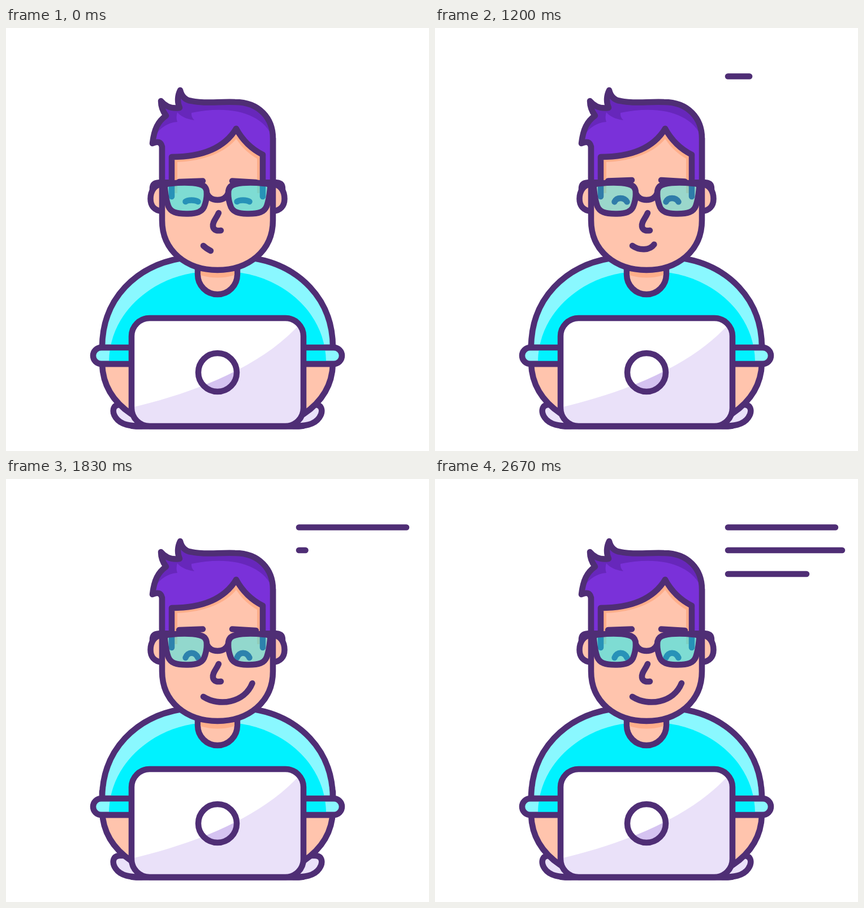
An HTML page that plays this animation: 748 px wide and 748 px high, repeating every 3030 ms.

```html
<!DOCTYPE html>
<html lang="en">
<head>
<meta charset="utf-8">
<title>Typing at a laptop</title>
<style>
  html, body { margin: 0; width: 100%; height: 100%; overflow: hidden; background: #fff; }
  svg { display: block; width: 100vw; height: 100vh; }
  .ink { stroke: #4f2e75; stroke-width: 10.5; stroke-linecap: round; stroke-linejoin: round; }
  .line { fill: none; }
  .skin { fill: #ffc4ad; }
  .shade { fill: #ffae8a; }
  .hair { fill: #7a31d9; }
  .dark { fill: #6727bb; }
  .lilac { fill: #eae1f9; }
  .pale { fill: #8af8ff; }
  .cyan { fill: #00f2ff; }
  .lens { fill: #00f5fa; }
</style>
</head>
<body>
<svg viewBox="0 0 748 748">
  <defs>
    <clipPath id="lid"><rect x="222" y="513" width="304" height="191" rx="32"/></clipPath>
    <clipPath id="disc"><circle cx="374" cy="609" r="34"/></clipPath>
    <path id="glare" d="M222 671C330 646 450 600 518 525H530V710H222Z"/>
    <path id="bump" d="M226 666H202C188 666 187 679 194 689C203 702 220 704 240 704"/>
    <path id="arm" d="M170 560V594C171 630 188 660 222 683"/>
    <path id="sleeve" d="M224 565H168.500A14.500 14.500 0 0 0 168.500 594H224Z"/>
    <path id="ear" d="M276 276C263 277 255.500 288 255.500 302C255.500 315 263 323 276 324"/>
    <path id="temple" d="M254 289C252 273 260 268 272 268H292V280H274Q262 280 254 289Z"/>
    <path id="rim" d="M281 284C280 277 284 275 291 275C310 273 328 273 342 276C351 278 355 283 355 292C355 302 353 310 350 317C346 325 338 328 322 328.500C300 329 291 325 287 315C283 304 282 294 281 284Z"/>
  </defs>

  <g id="notes" class="ink line"><path/><path/><path/></g>

  <!-- body -->
  <g class="ink lilac">
    <use href="#bump"/>
    <use href="#bump" transform="matrix(-1 0 0 1 748 0)"/>
  </g>
  <g id="arms" class="ink skin">
    <path d="M170 560V594C171 630 188 660 222 683V560Z" stroke="none"/>
    <path d="M578 560V594C577 630 560 660 526 683V560Z" stroke="none"/>
    <use href="#arm" fill="none"/>
    <use href="#arm" fill="none" transform="matrix(-1 0 0 1 748 0)"/>
  </g>
  <path class="pale" d="M170 565C170 478 231 420 311 407H437C517 420 578 478 578 565Z"/>
  <g class="ink pale">
    <use href="#sleeve"/>
    <use href="#sleeve" transform="matrix(-1 0 0 1 748 0)"/>
  </g>
  <path class="cyan" d="M182 589C184 500 262 440 340 432H408C486 440 564 500 566 589Z"/>
  <path class="ink line" d="M170 565C170 478 231 420 311 407M578 565C578 478 517 420 437 407M168 565H224M524 565H580M168 594H224M524 594H580"/>
  <path class="ink skin" d="M339 422V436A35 35 0 0 0 409 436V422Z"/>
  <path class="shade" d="M344 428H404V437Q374 446 344 437Z"/>

  <!-- head -->
  <g class="ink skin">
    <use href="#ear"/>
    <use href="#ear" transform="matrix(-1 0 0 1 748 0)"/>
    <path d="M276 210V340C276 395 320 428 374 428C428 428 472 395 472 340V195Z"/>
  </g>
  <path class="shade" d="M293 292V228C345 228 385 214 407 178C418 198 432 213 454 224V292Z"/>
  <path class="skin" d="M303 293V237C350 235 388 220 407 196C418 213 432 224 444 231V293Z"/>
  <path class="hair" d="M259 204C262 178 269 165 283 155C277 147 274 139 274 129C283 140 294 143 307 141C302 130 304 118 308 110C311 122 318 128 328 129C350 134 375 130 405 131C448 131 472 160 472 195V275H454V224C432 213 418 198 407 178C385 214 345 228 293 228V275H276V210C274 201 268 200 259 204Z"/>
  <path class="dark" d="M274 129C283 140 294 143 307 141C302 130 304 118 308 110C311 122 318 128 328 129C350 134 375 130 405 131C448 131 472 160 472 195C455 150 396 136 328 150Q327 157 333 163Q312 160 303 149Q300 158 303 166Q278 168 263 191C267 172 274 162 283 155Z"/>
  <path class="ink line" d="M276 272V210C274 201 268 200 259 204C262 178 269 165 283 155C277 147 274 139 274 129C283 140 294 143 307 141C302 130 304 118 308 110C311 122 318 128 328 129C350 134 375 130 405 131C448 131 472 160 472 195V275"/>
  <path class="ink line" d="M293 298V228C345 228 385 214 407 178"/>
  <path class="ink line" d="M407 178C418 198 432 213 454 224V298"/>

  <!-- face -->
  <g class="ink line">
    <path id="eyeL"/><path id="eyeR"/>
    <path id="brows" d="M306 272L348 270.500M400 270.500L442 273"/>
    <path d="M376 327C372 337 365 342 366 351C367 358 374 359 380 358"/>
    <path id="mouth"/>
  </g>
  <g id="lenses" class="lens">
    <use href="#rim"/>
    <use href="#rim" transform="matrix(-1 0 0 1 748 0)"/>
  </g>
  <g fill="#4f2e75">
    <use href="#temple"/>
    <use href="#temple" transform="matrix(-1 0 0 1 748 0)"/>
  </g>
  <g class="ink line">
    <use href="#rim"/>
    <use href="#rim" transform="matrix(-1 0 0 1 748 0)"/>
    <path d="M355 292Q360 304 374 304Q388 304 393 292"/>
  </g>

  <!-- laptop -->
  <rect x="222" y="513" width="304" height="191" rx="32" fill="#fff"/>
  <use href="#glare" class="lilac" clip-path="url(#lid)"/>
  <rect class="ink line" x="222" y="513" width="304" height="191" rx="32"/>
  <path class="ink line" d="M222 703.500Q230 705 250 704.500H498Q518 705 526 703.500"/>
  <circle cx="374" cy="609" r="34" fill="#fff"/>
  <use href="#glare" fill="#d5c3f1" clip-path="url(#disc)"/>
  <circle class="ink line" cx="374" cy="609" r="34"/>
</svg>
<script>
const LOOP = 3030, START = 870, STOP = 2670;
const $ = id => document.getElementById(id);
const clamp = u => Math.min(1, Math.max(0, u));
const span = (t, a, b) => clamp((t - a) / (b - a));
const smooth = u => u * u * (3 - 2 * u);

// y, full length, start time, end time
const NOTES = [[85.5, 190, 990, 1724], [126, 202, 1739, 2371], [168, 139, 2371, 2670]];
// time, how far the lens glow fades
const GLOW = [[870, 0], [1370, 1], [1670, .85], [2030, 0], [2270, .4], [2670, 0]];

function glowAt(t) {
  for (let i = 1; i < GLOW.length; i++) {
    const [a, x] = GLOW[i - 1], [b, y] = GLOW[i];
    if (t <= b) return x + (y - x) * span(t, a, b);
  }
  return 0;
}

// The opening plays the first stretch forward and back, then the scene runs through.
function sceneTime(t) {
  if (t < START) return START + Math.max(0, 400 - Math.abs(t - 470));
  return Math.min(t, STOP);
}

function eye(x, p) {
  const end = 307 + 9 * p * p;
  const top = 303.5 - 29 * p + 30.5 * p * p;
  return `M${x} ${end}C${x + 4} ${top} ${x + 17} ${top} ${x + 22} ${end}`;
}

function draw(ms) {
  const t = sceneTime(ms % LOOP);

  NOTES.forEach(([y, len, a, b], i) => {
    const p = smooth(span(t, a, b));
    $("notes").children[i].setAttribute("d", p > 0 ? `M518 ${y}H${518 + len * p}` : "");
  });

  const p = smooth(span(t, 990, 1724));
  $("eyeL").setAttribute("d", eye(317.5, p));
  $("eyeR").setAttribute("d", eye(408.5, p));
  $("brows").setAttribute("transform", `translate(0 ${-5 * clamp(p * 1.6)})`);

  const q = Math.sin(span(t, 1000, 1900) * Math.PI / 2);
  $("mouth").setAttribute("d",
    `M349 385C${353 + 24 * q} ${389 + 14 * q} ${358 + 64 * q} ${392 + 4 * q} ${362 + 74 * q} ${394 - 33 * q}`);

  const lift = Math.pow(Math.abs(Math.sin((t - START) / 360 * Math.PI)), 1.4);
  $("arms").setAttribute("transform", `translate(0 ${-9 * lift})`);
  $("lenses").setAttribute("opacity", .5 - .16 * glowAt(t));
}

function tick() {
  draw(performance.now());
  requestAnimationFrame(tick);
}
tick();
</script>
</body>
</html>
```
